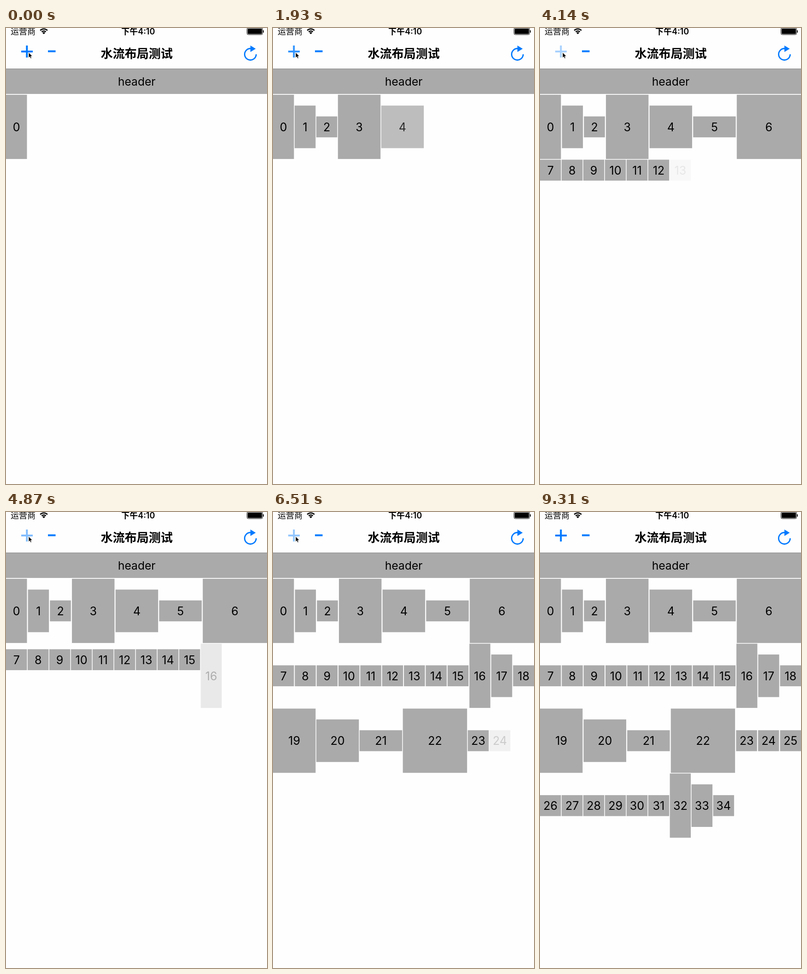
An HTML page with a canvas for the animation above (9.45 s loop, 566x989 px).

```html
<!DOCTYPE html>
<html lang="zh-CN">
<head>
<meta charset="utf-8">
<style>
  html, body { margin: 0; width: 100%; height: 100%; overflow: hidden; background: #fefefe; }
  canvas { display: block; width: 566px; height: 989px; }
</style>
</head>
<body>
<canvas id="stage" width="566" height="989"></canvas>
<script>
const ctx = document.getElementById('stage').getContext('2d');
const W = 566, H = 989, LOOP = 9450, STEP = LOOP / 64;
const PITCH = 46.93, GAP = 1.5, COLUMNS = 12, TOP = 144.8;
const COUNT = 35, FADE = 280, PRESS = 100, CURSOR_GONE = 9000;
const BLUE = '#007aff', GRAY = '#aaa';
const FONT = 'Inter, "Noto Sans CJK SC", "Noto Sans CJK", sans-serif';

// [item, insertion time]; items between are spaced evenly
const TAPS = [[0, -1000], [1, 230], [3, 1300], [4, 1726], [6, 2420], [13, 4089],
              [16, 4780], [19, 5470], [24, 6427], [30, 7679], [34, 8600]];

function tapTime(i) {
  const k = Math.max(1, TAPS.findIndex(([item]) => item >= i));
  const [a, ta] = TAPS[k - 1], [b, tb] = TAPS[k];
  return ta + (tb - ta) * (i - a) / (b - a);
}

const span = units => units * PITCH - GAP;

// Cell sizes in grid units repeat every 16 items
const cells = Array.from({ length: COUNT }, (_, i) => {
  const k = i % 16;
  return {
    start: tapTime(i),
    cols: k < 3 || k > 6 ? 1 : k < 6 ? 2 : 3,
    rows: k < 6 ? 3 - k % 3 : k === 6 ? 3 : 1
  };
});

// Flow layout of the first n cells: rows centred vertically, completed rows justified
function layout(n) {
  const lines = [[]];
  let used = 0;
  for (const cell of cells.slice(0, n)) {
    if (used + cell.cols > COLUMNS) { lines.push([]); used = 0; }
    lines[lines.length - 1].push(cell);
    used += cell.cols;
  }
  const spots = [];
  let y = TOP;
  lines.forEach((line, index) => {
    const rows = Math.max(...line.map(c => c.rows));
    const cols = line.reduce((sum, c) => sum + c.cols, 0);
    const extra = index < lines.length - 1 ? (W - span(cols)) / (line.length - 1) : 0;
    let x = 0;
    for (const c of line) {
      spots.push({ x, y: y + (rows - c.rows) * PITCH / 2 });
      x += c.cols * PITCH + extra;
    }
    y += rows * PITCH;
  });
  return spots;
}
const layouts = Array.from({ length: COUNT + 1 }, (_, n) => n ? layout(n) : []);

function progress(start, t) {
  const p = Math.min(1, Math.max(0, (t - start) / FADE));
  return p * p * (3 - 2 * p);
}

function text(str, x, y, size, weight = 400, align = 'center') {
  ctx.font = `${weight} ${size}px ${FONT}`;
  ctx.textAlign = align;
  ctx.fillStyle = '#000';
  ctx.fillText(str, x, y);
}

function rect(x, y, w, h, color) {
  ctx.fillStyle = color;
  ctx.fillRect(x, y, w, h);
}

function polygon(points, color) {
  ctx.beginPath();
  points.forEach(([x, y]) => ctx.lineTo(x, y));
  ctx.closePath();
  ctx.fillStyle = color;
  ctx.fill();
}

function arc(x, y, r, from, to, width, color) {
  ctx.beginPath();
  ctx.arc(x, y, r, from * Math.PI, to * Math.PI);
  ctx.lineWidth = width;
  ctx.strokeStyle = color;
  ctx.stroke();
}

function drawStatusBar() {
  text('运营商', 10, 14, 18, 400, 'left');
  text('下午4:10', 286.5, 14, 18, 600);
  for (const r of [6.5, 11]) arc(82, 13, r, 1.25, 1.75, 2.6, '#000');
  ctx.beginPath();
  ctx.moveTo(82, 13.5);
  ctx.arc(82, 13.5, 4.5, 1.25 * Math.PI, 1.75 * Math.PI);
  ctx.fillStyle = '#000';
  ctx.fill();
  ctx.lineWidth = 1;
  ctx.strokeStyle = '#000';
  ctx.beginPath();
  ctx.roundRect(522.5, -0.5, 34, 15, 3);
  ctx.stroke();
  ctx.beginPath();
  ctx.roundRect(524, 1, 31, 12, 1.5);
  ctx.fill();
  rect(557.5, 5, 1.5, 5, '#000');
}

function plusAlpha(t) {
  if (cells.some(c => t >= c.start - PRESS && t < c.start)) return 0.24;
  const last = cells.filter(c => c.start <= t).pop();
  return Math.min(1, 0.2 + 0.0031 * (t - last.start));
}

function drawNavBar(t) {
  ctx.globalAlpha = plusAlpha(t);
  ctx.beginPath();
  ctx.rect(33, 49, 25, 4);
  ctx.rect(43.3, 38, 4, 26);
  ctx.fillStyle = BLUE;
  ctx.fill();
  ctx.globalAlpha = 1;
  rect(91, 48.5, 16.5, 4, BLUE);
  text('水流布局测试', 283.5, 65, 26, 600);
  arc(530, 57, 12.5, 0, 1.5, 2.8, BLUE);
  polygon([[530, 38], [541.5, 45], [530, 52]], BLUE);
  rect(0, 88, W, 1, '#888');
  rect(0, 89, W, 54, GRAY);
  text('header', 283.5, 125, 24.6);
}

function drawCells(t) {
  cells.forEach((cell, i) => {
    if (t <= cell.start) return;
    let { x, y } = layouts[i + 1][i];
    for (let n = i + 2; n <= COUNT; n++) {
      const p = progress(cells[n - 1].start, t);
      x += (layouts[n][i].x - layouts[n - 1][i].x) * p;
      y += (layouts[n][i].y - layouts[n - 1][i].y) * p;
    }
    const w = span(cell.cols), h = span(cell.rows);
    ctx.globalAlpha = progress(cell.start, t);
    rect(x, y, w, h, GRAY);
    text(i, x + w / 2, y + h / 2 + 9.3, 25);
  });
  ctx.globalAlpha = 1;
}

function drawCursor() {
  const shape = [[49, 53], [49, 64.5], [51.6, 62.2], [53.4, 66.2], [55.4, 65.3], [53.7, 61.4], [57.2, 61.2]];
  polygon(shape, '#000');
  ctx.lineWidth = 0.8;
  ctx.strokeStyle = '#fff';
  ctx.stroke();
}

function draw(now) {
  // The screen is sampled at a fixed low rate
  const t = Math.floor((now % LOOP + 6) / STEP) % 64 * STEP;
  rect(0, 0, W, H, '#fefefe');
  drawStatusBar();
  drawNavBar(t);
  drawCells(t);
  if (t < CURSOR_GONE) drawCursor();
}

const begin = performance.now();
function frame() {
  draw(performance.now() - begin);
  requestAnimationFrame(frame);
}
frame();
</script>
</body>
</html>
```
